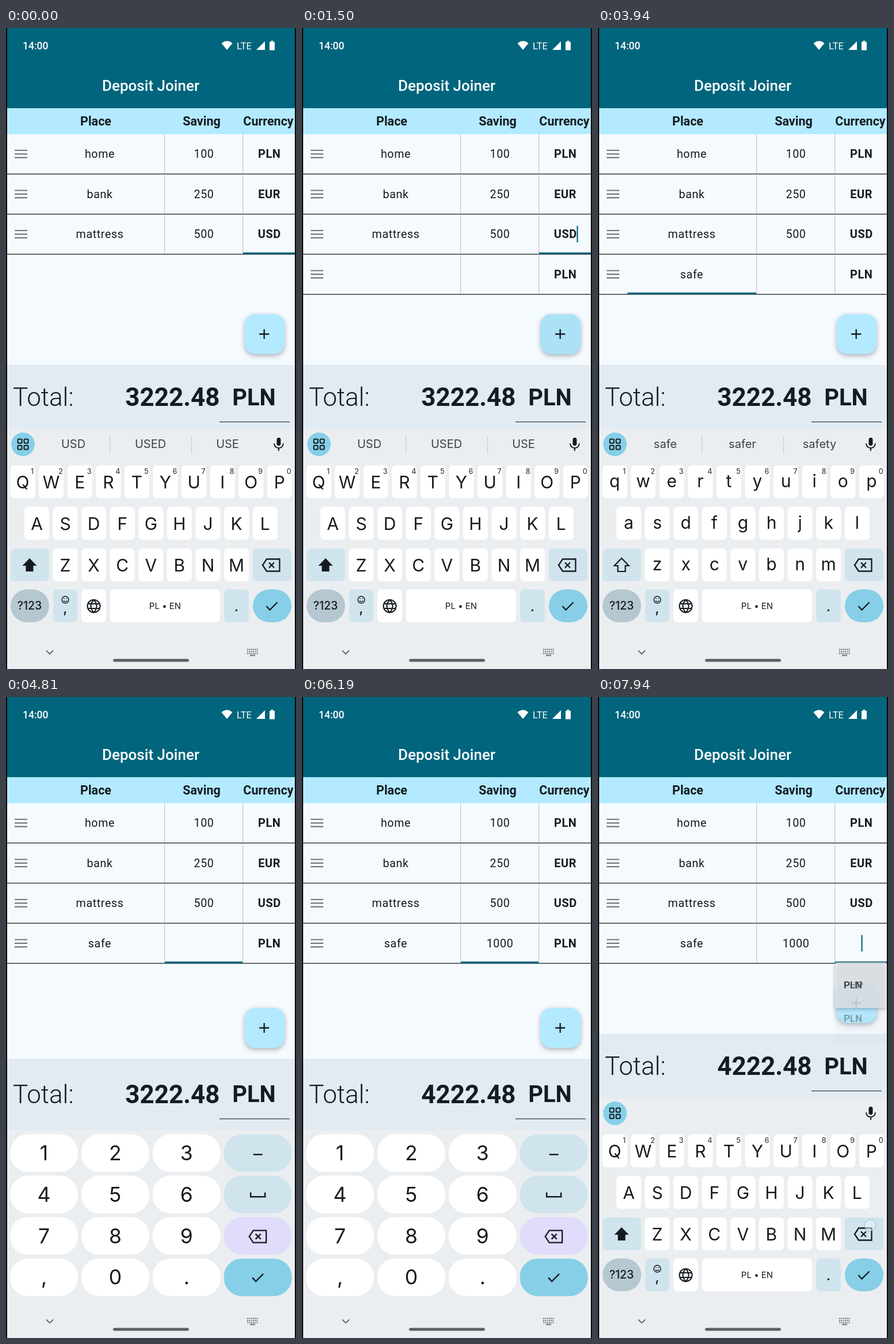
Animation of 504x1111 px, one loop 8000 ms. Source, as an HTML page with a canvas:

```html
<!DOCTYPE html>
<html lang="en">
<head>
<meta charset="utf-8">
<title>Deposit Joiner</title>
<style>
html, body { margin: 0; width: 504px; height: 1111px; overflow: hidden; background: #f5fafe; }
canvas { display: block; }
</style>
</head>
<body>
<canvas id="stage" width="504" height="1111"></canvas>
<script>
const ctx = document.getElementById('stage').getContext('2d');
const LOOP = 8000;
const INK = '#151b20', TEAL = '#00657d', SKY = '#b3eaff', PAPER = '#f5fafe';
const KEYS_BG = '#ebeef1', SOFT = '#d0e4ed', ACCENT = '#87cfe7';
const UI = 'Roboto, sans-serif', KB = 'Inter, sans-serif';

// Each touch: start, end, x, y
const touches = [
  [750, 880, 448, 536], [1560, 1690, 165, 428],
  [2560, 2690, 98, 864], [2760, 2935, 42, 863], [3060, 3200, 200, 864], [3380, 3510, 128, 794],
  [4250, 4380, 340, 430],
  [4940, 5070, 66, 796], [5190, 5320, 190, 1010], [5380, 5510, 190, 1010], [5630, 5760, 190, 1010],
  [6690, 6820, 456, 430],
  [7500, 7610, 480, 915], [7690, 7800, 477, 915], [7870, 8000, 473, 916]
];

// Stepped values: [time, value]
const place = [[0, ''], [2620, 's'], [2820, 'sa'], [3130, 'saf'], [3440, 'safe']];
const saving = [[0, ''], [5000, '1'], [5250, '10'], [5440, '100'], [5690, '1000']];
const currency = [[0, 'PLN'], [7560, 'PL'], [7750, 'P'], [7900, '']];
const focus = [[0, 'usd'], [1630, 'place'], [4310, 'saving'], [6750, 'currency']];
const blinkStart = [[0, 190], [1630, 1630], [2620, 2620], [2820, 2820], [3130, 3130], [3440, 3440],
  [4310, 4310], [5000, 5000], [5250, 5250], [5440, 5440], [5690, 5690], [6750, 7000],
  [7560, 7560], [7750, 7750], [7900, 7900]];
const hints = [[0, 'USD USED USE'], [1690, ''], [2620, 's się są'], [2820, 'sa są safe'],
  [3130, 'saf safe safety'], [3440, 'safe safer safety'], [6810, 'PLN PLAN PKN'],
  [7560, 'PL PLN PLAN'], [7750, 'P PO PLN'], [7900, '']];

const at = (track, t) => track.reduce((v, [time, next]) => t >= time ? next : v, track[0][1]);
const ramp = (t, a, b) => Math.max(0, Math.min(1, (t - a) / (b - a)));

function text(s, x, y, size, { weight = 400, font = UI, align = 'center', color = INK, gap = 0, base = 'alphabetic' } = {}) {
  ctx.font = `${weight} ${size}px ${font}`;
  ctx.letterSpacing = gap + 'px';
  ctx.textAlign = align;
  ctx.textBaseline = base;
  ctx.fillStyle = color;
  ctx.fillText(s, x, y);
}
function rect(x, y, w, h, color) {
  ctx.fillStyle = color;
  ctx.fillRect(x, y, w, h);
}
function pill(x, y, w, h, r, color) {
  ctx.beginPath();
  ctx.roundRect(x, y, w, h, r);
  ctx.fillStyle = color;
  ctx.fill();
}
function disc(x, y, r, color) {
  ctx.beginPath();
  ctx.arc(x, y, r, 0, 7);
  ctx.fillStyle = color;
  ctx.fill();
}
function shadow(color, blur, dy, draw) {
  ctx.save();
  ctx.shadowColor = color;
  ctx.shadowBlur = blur;
  ctx.shadowOffsetY = dy;
  draw();
  ctx.restore();
}
function icon(path, x, y, { color = INK, width = 2, fill = false } = {}) {
  ctx.save();
  ctx.translate(x, y);
  const p = new Path2D(path);
  ctx.fillStyle = ctx.strokeStyle = color;
  ctx.lineWidth = width;
  if (fill) ctx.fill(p); else ctx.stroke(p);
  ctx.restore();
}

function drawHeader() {
  rect(0, 0, 504, 139, TEAL);
  text('14:00', 29, 37, 17.5, { weight: 500, align: 'left', color: '#fff' });
  icon('M-9.5-3.5Q0-11.5 9.5-3.5L0 8Z', 384, 30, { color: '#fff', fill: true });
  text('LTE', 401, 36.5, 16.5, { align: 'left', color: '#fff' });
  icon('M450 23V38H435Z', 0, 0, { color: '#fff', fill: true });
  icon('M460.5 22h4v2h2.5v14.5h-9V24h2.5Z', 0, 0, { color: '#fff', fill: true });
  text('Deposit Joiner', 251.5, 109, 26, { weight: 500, color: '#fff' });
  rect(0, 139, 504, 45, SKY);
  [['Place', 156], ['Saving', 340], ['Currency', 456]].forEach(([s, x]) =>
    text(s, x, 169, 21.5, { weight: 700 }));
}

function drawRow(i, cells) {
  const y = 184 + i * 69.5;
  icon('M15 28H37M15 34.3H37M15 40.6H37', 0, y, { color: '#74787c', width: 2.2 });
  rect(275, y, 1.3, 68, '#c0cfd5');
  rect(411, y, 1.3, 68, '#c0cfd5');
  text(cells[0], 163, y + 41, 19.7, { gap: .6 });
  text(cells[1], 344, y + 41, 19.7, { gap: .6 });
  text(cells[2], 457.7, y + 41, 20, { weight: 700, gap: .5 });
  rect(0, y + 68.4, 504, 1.4, '#2c3034');
}

function drawFocus(t, cells) {
  const field = at(focus, t);
  const [x, w, mid, s, weight] = {
    usd: [412, 90, 457.5, 'USD', 700],
    place: [51, 224, 163, cells[0], 400],
    saving: [276, 135, 344, cells[1], 400],
    currency: [412, 90, 457.5, cells[2], 700]
  }[field];
  const y = field === 'usd' ? 323 : 392.5;
  rect(x, y + 66, w, 3, TEAL);
  const since = t - at(blinkStart, t);
  const on = field === 'usd' ? since >= 0 && since % 1000 < 500 : since < 0 || since % 1000 < 500;
  if (!on) return;
  ctx.font = `${weight} 20px ${UI}`;
  ctx.letterSpacing = '.5px';
  rect(mid + ctx.measureText(s).width / 2, y + 20, 2.2, 28.5, TEAL);
}

function drawFab(t, y) {
  shadow('rgba(20,40,55,.35)', 8, 3, () => pill(415, y, 69, 69, 18, SKY));
  const tint = .1 * ramp(t, 750, 880) * (1 - ramp(t, 1350, 1620));
  if (tint) pill(415, y, 69, 69, 18, `rgba(20,60,80,${tint})`);
  icon('M-8.5 0H8.5M0-8.5V8.5', 448.7, y + 34.5, { width: 2.3 });
}

function drawTotal(t, numeric) {
  const [top, bottom, base] = numeric ? [627, 751, 703.5] : [584, 695, 655];
  rect(0, top, 504, bottom - top, '#e2ebf1');
  const added = Number(at(saving, t - 370));
  text('Total:', 12, base, 44, { weight: 300, align: 'left' });
  text((3222.48 + added).toFixed(2), 371.5, base, 44, { weight: 700, align: 'right' });
  text('PLN', 431, base - 1.5, 40, { weight: 700 });
  rect(371, base + 27, 122, 1.3, '#3d4347');
}

function drawBackspace(x, y) {
  icon('M-15 0L-8-10.5H14.5V10.5H-8ZM-4-4.5L5 4.5M5-4.5L-4 4.5', x, y, { width: 2.3 });
}
const drawCheck = (x, y) => icon('M-9.5 0L-3.5 6.5L9.5-6.5', x, y, { width: 2.3 });

function drawStrip(t) {
  disc(29.5, 721.5, 20.5, ACCENT);
  for (const x of [20.5, 31.5]) for (const y of [712.5, 723.5]) {
    ctx.beginPath();
    ctx.roundRect(x, y, 7, 7, 1.5);
    ctx.lineWidth = 2;
    ctx.strokeStyle = INK;
    ctx.stroke();
  }
  const words = at(hints, t).split(' ');
  if (words.length > 1) {
    rect(180, 706, 1, 32, '#c3c9ce');
    rect(322, 706, 1, 32, '#c3c9ce');
    words.forEach((w, i) => text(w, [117, 251, 385][i], 728, 20,
      { font: KB, color: '#3a4248', weight: w === 'są' && i === 1 ? 700 : 400 }));
  }
  pill(470.5, 710, 7, 14, 3.5, INK);
  icon('M466 720Q467 728 474 728T482 720M474 728V733', 0, 0);
}

function drawLetters(t) {
  const upper = t < 1690 || t >= 6810;
  const rows = [['qwertyuiop', 29, 758], ['asdfghjkl', 53.5, 830], ['zxcvbnm', 103, 902]];
  rows.forEach(([letters, x0, y], row) => [...letters].forEach((c, i) => {
    const x = x0 + i * 49.6;
    pill(x - 21.5, y, 43, 57, 7, '#fff');
    text(upper ? c.toUpperCase() : c, x, y + (upper ? 39.5 : 37.5), 30, { font: KB });
    if (!row) text((i + 1) % 10, x + 16.5, y + 14.5, 12.5, { font: KB, weight: 500, color: '#3a4248' });
  }));
  pill(8, 902, 67, 57, 7, SOFT);
  icon('M0-12L12.5 1H6.5V11H-6.5V1H-12.5Z', 41, 931, { fill: upper, width: 2.2 });
  pill(429, 902, 67, 57, 7, SOFT);
  drawBackspace(461, 931);

  pill(8, 973, 67, 57, 28.5, '#b5c7d0');
  text('?123', 41, 1008, 19.5, { font: KB, weight: 500 });
  pill(82, 973, 42, 57, 7, SOFT);
  icon('M6 0A6 6 0 1 1-6 0A6 6 0 1 1 6 0M-3.2 1.5Q0 5 3.2 1.5M-3-2h1.6M1.4-2h1.6', 103, 991, { width: 1.5 });
  text(',', 103, 1014, 24, { font: KB, weight: 500 });
  pill(131, 973, 43, 57, 7, '#fff');
  icon('M11 0A11 11 0 1 1-11 0A11 11 0 1 1 11 0M0-11Q-10 0 0 11Q10 0 0-11M-10-4H10M-10 4H10', 152.5, 1002);
  pill(181, 973, 191, 57, 7, '#fff');
  text('PL • EN', 276.5, 1007, 15, { font: KB });
  pill(379, 973, 43, 57, 7, SOFT);
  text('.', 400.5, 1011, 24, { font: KB, weight: 500 });
  pill(429, 973, 67, 57, 28.5, ACCENT);
  drawCheck(462, 1002);
}

function drawNumbers(t) {
  ['123-', '456_', '789<', ',0.>'].forEach((keys, row) => [...keys].forEach((c, col) => {
    const x = 7 + col * 123.9, y = 758 + row * 71.8, mid = x + 59;
    pill(x, y, 118, 65, 31, { '-': SOFT, _: SOFT, '<': '#e0dcfb', '>': ACCENT }[c] || '#fff');
    const pressed = touches.some(([a, b, tx, ty]) => t >= a && t < a + 70 &&
      tx > x && tx < x + 118 && ty > y && ty < y + 65);
    if (pressed) pill(x, y, 118, 65, 31, 'rgba(20,50,70,.1)');
    if (c === '-') icon('M-8 0H8', mid, y + 35, { width: 2.5 });
    else if (c === '_') icon('M-12.5-4V3.5H12.5V-4', mid, y + 33, { width: 2.5 });
    else if (c === '<') drawBackspace(mid, y + 33.5);
    else if (c === '>') drawCheck(mid, y + 33);
    else text(c, mid, y + 45, 35.5, { font: KB });
  }));
}

function drawNavigation() {
  icon('M-6-3L0 3L6-3', 76, 1082, { color: '#5f676c', width: 1.8 });
  pill(186, 1093.5, 132, 5, 2.5, '#5b6064');
  for (let row = 0; row < 3; row++)
    for (let i = 0; i < 6; i++) rect(419 + i * 3.3, 1076 + row * 3.6, 2, 2, '#6a7176');
  rect(424, 1086.5, 9, 2, '#6a7176');
}

function drawMenu(items, y, h, paper, ink) {
  ctx.save();
  ctx.globalAlpha = paper;
  shadow('rgba(20,40,55,.4)', 6, 2, () => pill(412, y, 90, h, 4, KEYS_BG));
  ctx.globalAlpha = ink;
  items.forEach((s, i) => text(s, 427, y + 45 + i * 58.4, 17, { weight: 500, align: 'left' }));
  ctx.restore();
}

function drawMenus(t) {
  const full = ramp(t, 6870, 7000) * (1 - ramp(t, 7560, 7690));
  if (full) drawMenu(['AUD', 'BGN', 'BRL', 'CAD'], 119, 274, full, full);
  const single = ramp(t, 7600, 7720) * (1 - .2 * ramp(t, 7900, 7940));
  if (single) drawMenu(['PLN'], 460, 79, single, single);
  const pair = .4 * ramp(t, 7780, 7940);
  if (pair) drawMenu(['PHP', 'PLN'], 460, 137, pair * .15, pair);
}

function drawTouches(t) {
  for (const [a, b, x, y] of touches) {
    if (t < a || t >= b) continue;
    disc(x, y, 10, 'rgba(235,245,255,.5)');
    ctx.lineWidth = 1;
    ctx.strokeStyle = 'rgba(110,130,150,.5)';
    ctx.stroke();
  }
}

function draw(now) {
  const t = now % LOOP;
  const numeric = t >= 4380 && t < 6810;
  const last = [place, saving, currency].map(track => at(track, t));
  rect(0, 0, 504, 1111, PAPER);
  drawHeader();
  [['home', '100', 'PLN'], ['bank', '250', 'EUR'], ['mattress', '500', 'USD']].forEach((r, i) => drawRow(i, r));
  ctx.globalAlpha = ramp(t, 940, 1200);
  drawRow(3, last);
  ctx.globalAlpha = 1;
  drawFocus(t, last);
  drawFab(t, numeric ? 539 : 496);
  drawTotal(t, numeric);
  rect(0, numeric ? 751 : 695, 504, 420, KEYS_BG);
  if (numeric) drawNumbers(t);
  else {
    drawStrip(t);
    drawLetters(t);
  }
  drawNavigation();
  drawMenus(t);
  drawTouches(t);
  rect(0, 0, 2, 1111, '#08090a');
  rect(502, 0, 2, 1111, '#08090a');
  requestAnimationFrame(draw);
}
draw(performance.now());
</script>
</body>
</html>
```
